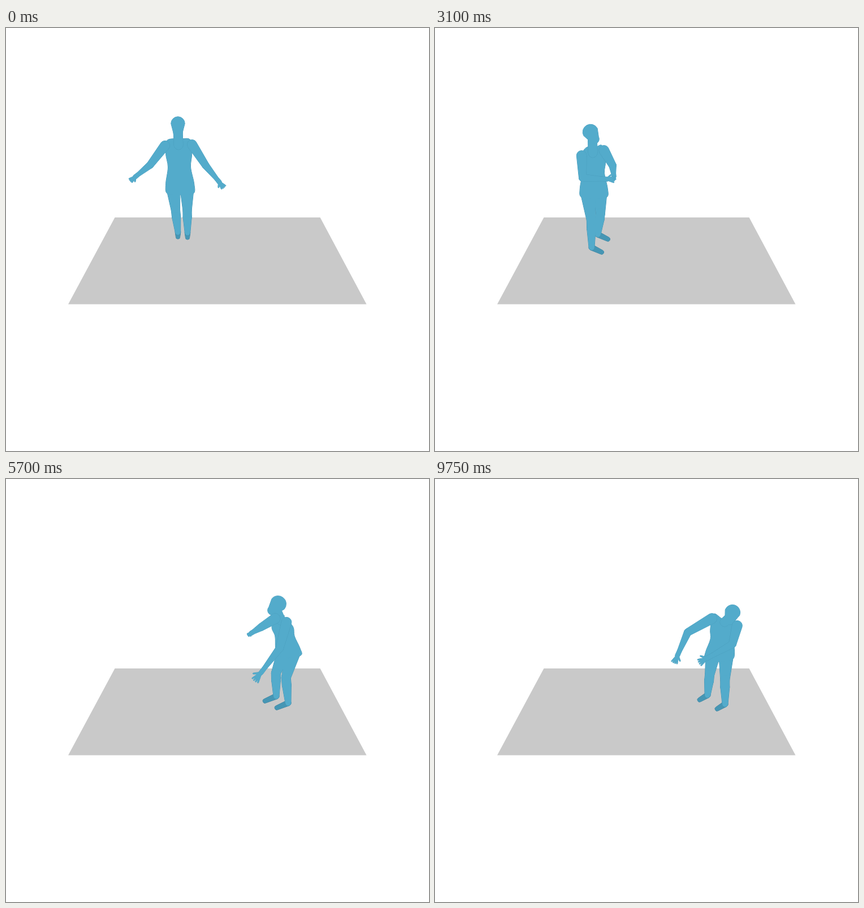
An HTML page with a canvas for the animation above (9.8 s loop, 748 px wide and 748 px high).

```html
<!DOCTYPE html>
<html lang="en">
<head>
<meta charset="utf-8">
<title>Walking figure</title>
<style>
html, body { margin: 0; width: 100%; height: 100%; overflow: hidden; background: #fff; }
canvas { display: block; width: 748px; height: 748px; }
</style>
</head>
<body>
<canvas id="stage" width="748" height="748"></canvas>
<script>
const ctx = document.getElementById('stage').getContext('2d');
const LOOP = 9800, STEP = 50;
const SKIN = 'rgb(83,171,203)', RIM = 'rgb(68,146,177)', SOFT = 'rgb(74,158,190)';
const FOOT = 'rgb(70,150,180)', FOOT_RIM = 'rgb(58,126,153)';

// A few guiding points per pose; the rig works out the rest.
// turn: degrees, 0 faces the viewer. Arms are elbow and fingertip, feet are ankles.
const stand = {
  turn: [0], head: [304, 169], chest: [305, 207], hips: [308, 285],
  armR: [255, 242, 220, 270], armL: [353, 243, 385, 282],
  footR: [304, 361], footL: [321, 362]
};
const stepOut = {
  turn: [5], head: [262, 197], chest: [277, 231], hips: [290, 303],
  armR: [251, 272, 233, 342], armL: [325, 254, 364, 291],
  footR: [274, 395], footL: [319, 364]
};
const gather = {
  turn: [42], head: [275, 184], chest: [279, 221], hips: [281, 292],
  armR: [261, 265, 317, 268], armL: [314, 243, 317, 268],
  footR: [277, 388], footL: [288, 365]
};
const walk = {
  turn: [82], head: [361, 176], chest: [355, 216], hips: [350, 285],
  armR: [358, 259, 415, 238], armL: [371, 237, 410, 246],
  footR: [334, 369], footL: [352, 353]
};
const reach = {
  turn: [-75], head: [481, 221], chest: [486, 250], hips: [500, 306],
  armR: [451, 262, 428, 276], armL: [484, 299, 440, 357],
  footR: [478, 384], footL: [499, 396]
};
const present = {
  turn: [-30], head: [526, 207], chest: [519, 238], hips: [514, 308],
  armR: [462, 270, 442, 314], armL: [526, 292, 467, 325],
  footR: [482, 382], footL: [513, 398]
};
const bow = {
  ...present, head: [526, 236], chest: [512, 253], hips: [503, 313],
  armR: [447, 271, 423, 325]
};

const lerp = (a, b, k) => a + (b - a) * k;
const clamp = (v, low, high) => Math.max(low, Math.min(high, v));
const between = (p, q, k) => [lerp(p[0], q[0], k), lerp(p[1], q[1], k)];
const offset = (p, dx, dy) => [p[0] + dx, p[1] + dy];
const mapPose = (pose, fn) => Object.fromEntries(
  Object.entries(pose).map(([name, list]) => [name, list.map((v, i) => fn(v, name, i))]));
const mix = (a, b, k) => mapPose(a, (v, name, i) => lerp(v, b[name][i], k));

// Slide sideways and stretch upward from the feet.
const shift = (pose, dx, dy) => mapPose(pose, (v, name, i) =>
  name === 'turn' ? v : i % 2 ? v + dy * clamp((390 - v) / 190, 0, 1) : v + dx);

const keys = [
  [0, stand],
  [1000, shift(stand, 2, 3)],
  [1800, stepOut],
  [2400, { ...mix(stepOut, gather, .35), armR: [238, 267, 214, 322] }],
  [3100, gather],
  [4000, walk],
  [5000, shift(mix(walk, reach, .72), 8, -20)],
  [5700, reach],
  [6600, shift(mix(reach, present, .7), 0, -14)],
  [7200, present],
  [8050, present],
  [9050, mix(present, bow, .76)],
  [9750, bow]
];

// Smooth interpolation that never overshoots the poses.
function poseAt(t) {
  let n = 0;
  while (n < keys.length - 2 && t >= keys[n + 1][0]) n++;
  const span = keys[n + 1][0] - keys[n][0];
  const u = clamp((t - keys[n][0]) / span, 0, 1);
  return mapPose(keys[n][1], (v, name, i) => {
    const value = j => keys[j][1][name][i];
    const slope = j => j < 0 || j > keys.length - 2 ? 0 :
      (value(j + 1) - value(j)) / (keys[j + 1][0] - keys[j][0]);
    const tangent = j => {
      const a = slope(j - 1), b = slope(j);
      return a * b <= 0 ? 0 : 2 * a * b / (a + b);
    };
    return lerp(v, value(n + 1), u * u * (3 - 2 * u)) +
      span * u * (1 - u) * ((1 - u) * tangent(n) - u * tangent(n + 1));
  });
}

function taper(p, r1, q, r2) {
  const path = new Path2D(), a = Math.atan2(q[1] - p[1], q[0] - p[0]), right = Math.PI / 2;
  path.arc(...p, r1, a + right, a + 3 * right);
  path.arc(...q, r2, a - right, a + right);
  path.closePath();
  return path;
}

function smooth(points) {
  const path = new Path2D(), n = points.length;
  const at = i => points[(i + n) % n];
  path.moveTo(...points[0]);
  for (let i = 0; i < n; i++) {
    const [a, b, c, d] = [at(i - 1), at(i), at(i + 1), at(i + 2)];
    path.bezierCurveTo(b[0] + (c[0] - a[0]) / 6, b[1] + (c[1] - a[1]) / 6,
      c[0] - (d[0] - b[0]) / 6, c[1] - (d[1] - b[1]) / 6, ...c);
  }
  return path;
}

function paint(paths, fill, rim) {
  ctx.lineWidth = 1;
  ctx.strokeStyle = rim;
  ctx.fillStyle = fill;
  paths.forEach(p => ctx.stroke(p));
  paths.forEach(p => ctx.fill(p));
}

function arm(shoulder, [ex, ey, tx, ty], side, size) {
  const elbow = [ex, ey], tip = [tx, ty];
  const wrist = between(elbow, tip, .6), palm = between(elbow, tip, .76);
  const angle = Math.atan2(ty - ey, tx - ex), reach = Math.hypot(tx - palm[0], ty - palm[1]);
  const finger = (bend, length) => taper(palm, 1.9,
    [palm[0] + Math.cos(angle + bend) * length, palm[1] + Math.sin(angle + bend) * length], 1);
  return [
    taper(shoulder, 8.5 * size, elbow, 6.2 * size),
    taper(elbow, 6.2 * size, wrist, 3.7 * size),
    taper(wrist, 3.7 * size, palm, 4),
    ...[-.36, -.12, .12, .36].map(bend => finger(bend, reach)),
    finger(side * .85, reach * .75)
  ];
}

function leg(hip, ankle, bend, size) {
  const knee = offset(between(hip, ankle, .49), bend, 0), calf = between(knee, ankle, .3);
  return [
    taper(hip, 12 * size, knee, 7.6 * size),
    taper(knee, 7.6 * size, calf, 7.6 * size),
    taper(calf, 7.6 * size, ankle, 4.7 * size)
  ];
}

function figure(pose) {
  const { head, chest, hips, footR, footL } = pose;
  const turn = pose.turn[0] * Math.PI / 180, sin = Math.sin(turn), cos = Math.cos(turn);
  const size = 1 + (Math.max(footR[1], footL[1]) - 361) * .0015;

  // Shoulders sit square to the spine and narrow as the body turns.
  const spine = Math.atan2(hips[0] - chest[0], hips[1] - chest[1]);
  const broad = 24 * size * (.2 + .8 * cos), hipGap = 12 * size * (.45 + .55 * cos);
  const shoulder = side => offset(chest, side * broad * Math.cos(spine),
    -side * (broad * Math.sin(spine) + 6 * sin));
  const hip = side => offset(hips, side * hipGap, -side * 2 * sin);

  const flank = side => [[.2, 16, 7], [.5, 15, 5], [.88, 19, 6], [1.1, 18, 5]].map(
    ([down, base, front]) => offset(between(chest, hips, down), side * size * (base + front * cos), 0));
  const neck = offset(between(chest, head, .3), 0, 0);
  const torso = smooth([
    offset(neck, -7, 0), offset(shoulder(-1), 3, -8), ...flank(-1),
    offset(hips, 0, 10),
    ...flank(1).reverse(), offset(shoulder(1), -3, -8), offset(neck, 7, 0)
  ]);

  const jaw = offset(head, 10 * sin, 15 - 4 * Math.abs(sin));
  const skull = 12.2 * size + 1.6 * Math.abs(sin);
  const toe = 20 * Math.sin(clamp(turn * 1.5, -Math.PI / 2, Math.PI / 2));
  const foot = ankle => taper(ankle, 4.8 * size, offset(ankle, toe, 8.5), 3.6 * size);
  const bend = 9 * sin ** 3;

  paint([footR, footL].map(foot), FOOT, FOOT_RIM);
  paint([...leg(hip(1), footL, bend, size), ...leg(hip(-1), footR, bend, size), torso], SKIN, RIM);
  paint([taper(chest, 8, between(head, jaw, .5), 8), taper(head, skull, jaw, 8.3 * size)], SKIN, SOFT);
  paint(arm(shoulder(1), pose.armL, 1, size), SKIN, SOFT);
  paint(arm(shoulder(-1), pose.armR, -1, size), SKIN, SOFT);
}

function floor() {
  ctx.fillStyle = '#c9c9c9';
  ctx.beginPath();
  ctx.moveTo(192.5, 335);
  ctx.lineTo(555.5, 335);
  ctx.lineTo(637.5, 488.5);
  ctx.lineTo(110, 488.5);
  ctx.fill();
}

function draw(t) {
  ctx.fillStyle = '#fff';
  ctx.fillRect(0, 0, 748, 748);
  floor();
  figure(poseAt(t));
}

const start = performance.now();
function tick() {
  const elapsed = Math.max(0, performance.now() - start) % LOOP;
  draw(Math.floor(elapsed / STEP) * STEP);
  requestAnimationFrame(tick);
}
tick();
</script>
</body>
</html>
```
